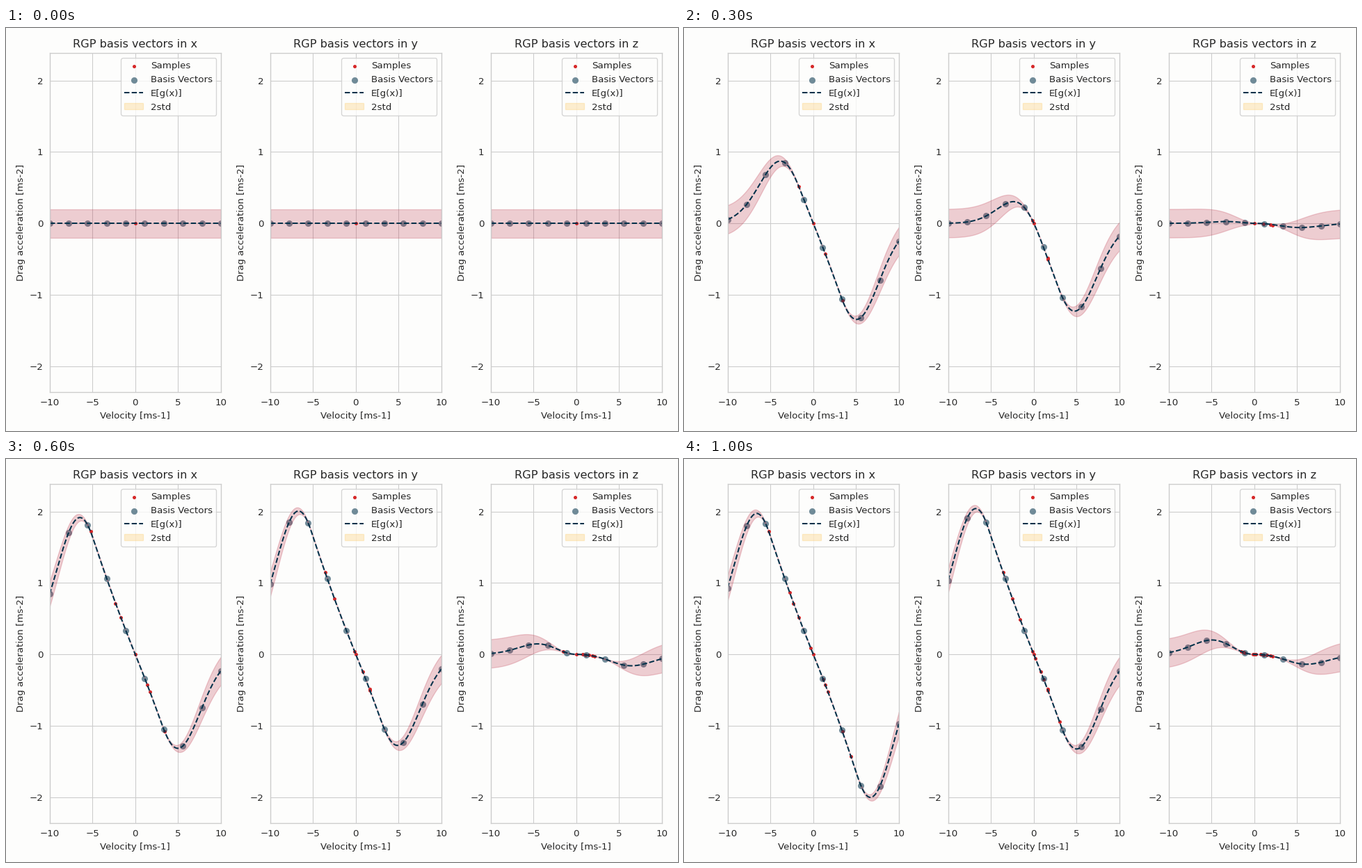
A matplotlib script that plays this animation: 966 px wide and 580 px high, repeating every 1.1 s.

```python
import numpy as np
import matplotlib.pyplot as plt
from matplotlib.animation import FuncAnimation

W, H, DPI = 966, 580, 96.6
STEPS, INTERVAL = 11, 100
NAVY, RED, ROSE, GOLD = "#003049", "#d62828", "#b8243c", "#fcbf49"
PAPER = "#fdfdfc"
LENGTH, PRIOR_STD, NOISE = 2.98, 0.1, 0.0016

plt.rcParams.update({
    "font.family": "DejaVu Sans", "font.size": 10,
    "text.color": ".15", "axes.labelcolor": ".15",
    "xtick.color": ".15", "ytick.color": ".15",
    "figure.facecolor": PAPER, "axes.facecolor": PAPER,
    "axes.edgecolor": ".8", "axes.linewidth": 1, "axes.axisbelow": True,
    "grid.color": ".8", "grid.linewidth": 0.8,
    "xtick.major.size": 0, "ytick.major.size": 0,
    "xtick.major.pad": 7, "ytick.major.pad": 7,
})

basis = np.linspace(-10, 10, 10)
grid = np.linspace(-10, 10, 200)


def side_drag(v):
    return -v * (.295 + .007 * np.abs(v))


def lift_drag(v):
    return -v * np.abs(v) * np.where(v > 0, .006, .017)


# Per axis: drag law, velocity sampled at each step, and the range that the
# model has learnt as (from step, low, high, strength).
AXES = {
    "x": (side_drag,
          [0, 3.4, 1.4, -1.7, -2.3, -5.2, 1.7, 4.4, 1.15, -2.75, -.3],
          [(1, 2.8, 2.8, 1), (3, -1.35, 3.1, 1), (5, -4.9, 3, 1),
           (7, -5.07, 5.16, 1)]),
    "y": (side_drag,
          [0, -.15, 1.6, 1.65, .8, -2.5, -3.6, -1.6, 1.15, .2, 3],
          [(1, -.2, -.2, .5), (2, 1.6, 2.7, 1), (5, -1.95, 3.07, 1),
           (6, -5.17, 2.86, 1), (8, -5.27, 3.03, 1)]),
    "z": (lift_drag,
          [0, 1.85, 2.1, 1.1, .75, 1.5, -1.5, -1.3, -1.1, -.15, .15],
          [(1, 2, 2, .65), (5, 2, 3.7, .83), (6, -.6, 3.65, 1),
           (9, -1.35, 3.2, 1)]),
}


def kernel(a, b):
    return np.exp(-np.subtract.outer(a, b) ** 2 / (2 * LENGTH ** 2))


def estimate(v, law, low, high, strength):
    """Drag law inside the learnt range, fading to zero outside it."""
    excess = v - np.clip(v, low, high)
    return strength * law(v) * np.exp(-(excess / LENGTH) ** 2 / 2)


def two_std(seen):
    """Spread of a Gaussian process observed at the given velocities."""
    cross = kernel(grid, seen)
    gram = kernel(seen, seen) + NOISE * np.eye(len(seen))
    var = 1 - np.sum(cross * np.linalg.solve(gram, cross.T).T, axis=1)
    return 2 * PRIOR_STD * np.sqrt(np.maximum(var, 0))


class Panel:
    def __init__(self, fig, left, axis):
        self.law, velocities, self.ranges = AXES[axis]
        self.velocities = np.array(velocities, float)
        ax = fig.add_axes([left / W, 1 - 523.9 / H, 246.3 / W, 487.6 / H])
        ax.set(xlim=(-10, 10), ylim=(-2.3637, 2.3832),
               xticks=range(-10, 11, 5), yticks=range(-2, 3),
               title=f"RGP basis vectors in {axis}",
               xlabel="Velocity [ms-1]", ylabel="Drag acceleration [ms-2]")
        ax.grid(True)
        self.samples = ax.scatter([], [], s=14, color=RED, linewidths=0,
                                  label="Samples")
        self.nodes = ax.scatter([], [], s=46, color=NAVY, alpha=.55,
                                linewidths=0, label="Basis Vectors")
        self.line, = ax.plot([], [], "--", color=NAVY, lw=1.5, label="E[g(x)]")
        self.band = ax.fill_between(grid, -.2, .2, color=ROSE, alpha=.22,
                                    label="2std")
        legend = ax.legend(loc="upper right", frameon=True, edgecolor=".8")
        legend.get_patches()[0].set(color=GOLD, alpha=.25)

    def show(self, step):
        seen = self.velocities[:step + 1]
        if step:
            _, *learnt = [r for r in self.ranges if r[0] <= step][-1]
            spread = two_std(np.append(seen, learnt[:2]))
        else:
            learnt = 0, 0, 0
            spread = np.full(grid.shape, 2 * PRIOR_STD)
        mean = estimate(grid, self.law, *learnt)
        nodes = estimate(basis, self.law, *learnt)

        self.samples.set_offsets(np.column_stack([seen, self.law(seen)]))
        self.nodes.set_offsets(np.column_stack([basis, nodes]))
        self.line.set_data(grid, mean)
        upper = np.column_stack([grid, mean + spread])
        lower = np.column_stack([grid, mean - spread])
        self.band.set_verts([np.vstack([upper, lower[::-1]])])
        return [self.samples, self.nodes, self.line, self.band]


# The tiny surplus keeps the pixel size from rounding down.
fig = plt.figure(figsize=((W + .01) / DPI, (H + .01) / DPI), dpi=DPI)
panels = [Panel(fig, 62.65 + 317.03 * i, axis) for i, axis in enumerate(AXES)]


def update(step):
    return [artist for panel in panels for artist in panel.show(step)]


anim = FuncAnimation(fig, update, frames=STEPS, init_func=lambda: update(0),
                     interval=INTERVAL, repeat=True, repeat_delay=0, blit=False)
plt.show()
```
